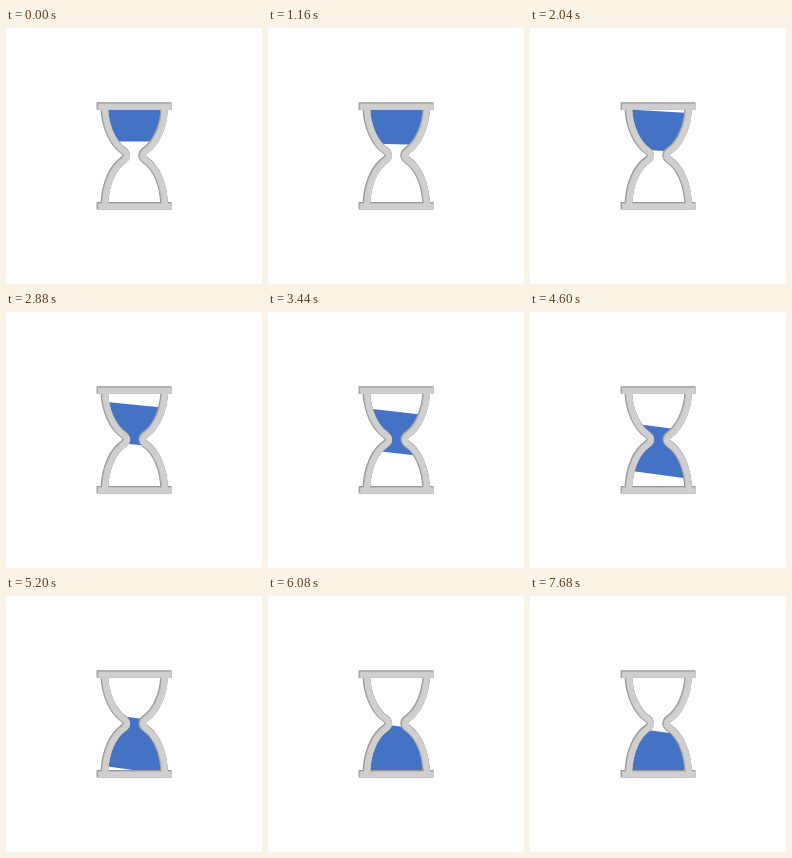
These frames come from a looping animation (256 px wide and 256 px high, 7890 ms). An HTML page with a canvas:

```html
<!DOCTYPE html>
<html lang="en">
<head>
<meta charset="utf-8">
<title>Hourglass</title>
<style>
  html, body { margin: 0; width: 100%; height: 100%; overflow: hidden; background: #fff; }
  canvas { display: block; width: 100vw; height: 100vh; }
</style>
</head>
<body>
<canvas id="stage" width="256" height="256"></canvas>
<script>
const ctx = document.getElementById('stage').getContext('2d');
const LOOP = 7890, FLOW = 7520, STEP = 40;
const CX = 128.2, REACH = 40;

const wall = new Path2D('M98.2 79C98.8 99 107 115.5 117.3 122.6Q123.3 127.3 117.3 132C107 139 98.8 155 98.2 178');
const mirrored = new Path2D();
mirrored.addPath(wall, new DOMMatrix([-1, 0, 0, 1, 2 * CX, 0]));

const walls = new Path2D(wall);
walls.addPath(mirrored);

// The glass is everything inside both wall lines
const sides = [[wall, 2 * CX], [mirrored, 0]].map(([path, x]) => {
  const side = new Path2D(path);
  side.lineTo(x, 178);
  side.lineTo(x, 79);
  side.closePath();
  return side;
});

function drawSand(t) {
  const p = Math.min(t / FLOW, 1);
  const e = (1 - Math.cos(Math.PI * p)) / 2;
  const top = 72.5 + 63 * e;
  const bottom = top + 40.9 - 16 * e + 39 * e * e;
  const tilt = 8 * (1 - (1 - e) ** 3);
  const rise = REACH * Math.tan(tilt * Math.PI / 180);

  ctx.save();
  sides.forEach(side => ctx.clip(side));
  ctx.fillStyle = '#4472c4';
  ctx.beginPath();
  ctx.moveTo(CX - REACH, top - rise);
  ctx.lineTo(CX + REACH, top + rise);
  ctx.lineTo(CX + REACH, bottom + rise);
  ctx.lineTo(CX - REACH, bottom - rise);
  ctx.fill();
  ctx.restore();
}

// Stacked layers, each cut back at the top left, make the soft bevel
function drawFrame() {
  const layers = 4;
  for (let i = 0; i < layers; i++) {
    const cut = i * 0.6;
    const gray = 145 + 62 * i / (layers - 1);
    ctx.fillStyle = ctx.strokeStyle = `rgb(${gray}, ${gray}, ${gray})`;
    ctx.lineWidth = 7.6 - cut;
    ctx.save();
    ctx.translate(cut / 2, cut / 4);
    ctx.stroke(walls);
    ctx.restore();
    for (const y of [74.3, 174]) ctx.fillRect(90.6 + cut, y + cut, 74.8 - cut, 7.4 - cut);
  }
}

function draw(t) {
  ctx.fillStyle = '#fff';
  ctx.fillRect(0, 0, 256, 256);
  drawSand(t);
  drawFrame();
}

function tick() {
  const t = performance.now() % LOOP;
  draw(Math.floor(t / STEP) * STEP);
  requestAnimationFrame(tick);
}
tick();
</script>
</body>
</html>
```
